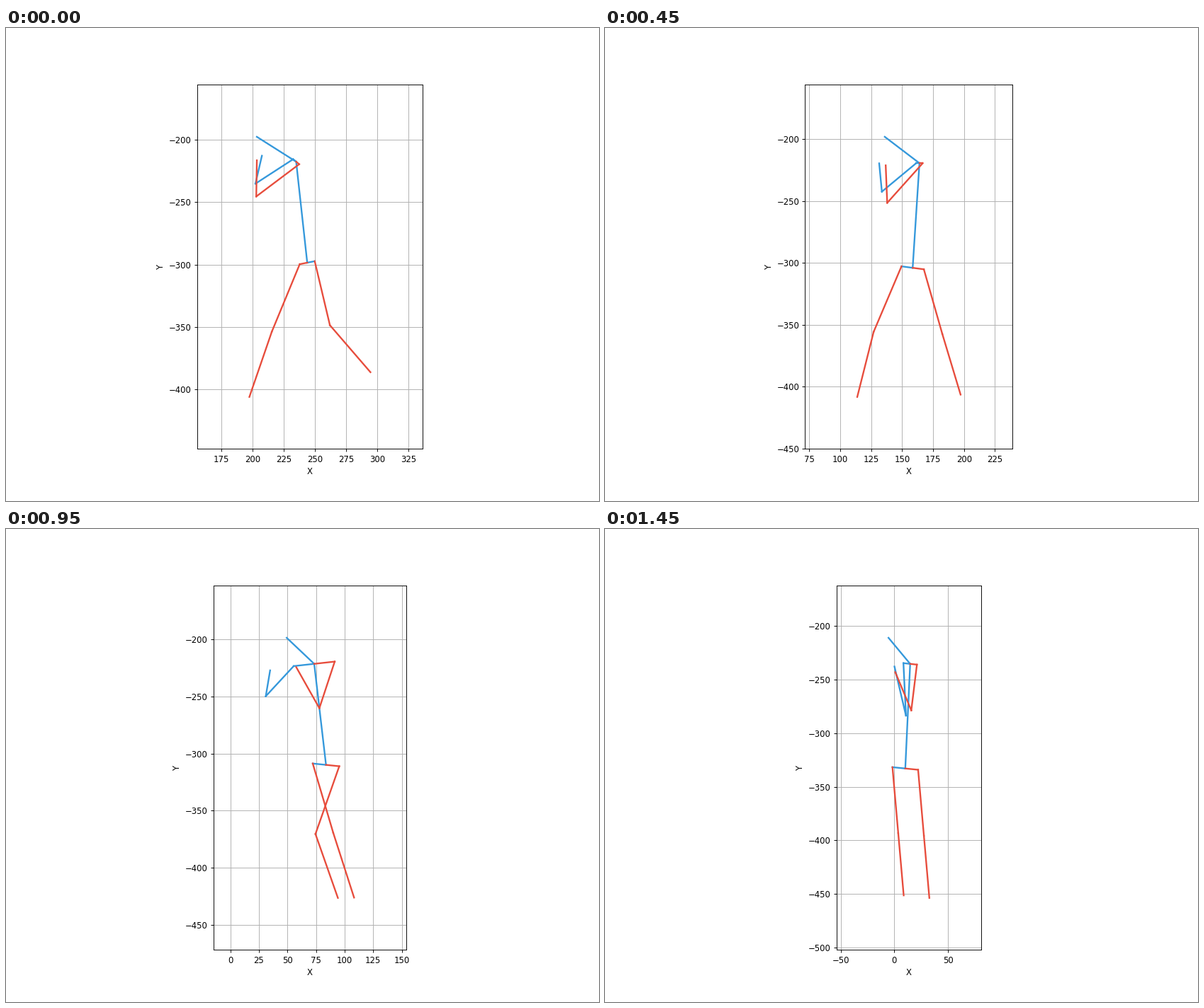
A matplotlib script that plays this animation: 837 px wide and 669 px high, repeating every 1.5 s.

```python
import numpy as np
import matplotlib.pyplot as plt
from matplotlib.animation import FuncAnimation

W, H, DPI = 837, 669, 83.7
FRAMES, INTERVAL = 30, 50
BLUE, RED = "#3498db", "#e74c3c"
MARGIN = 0.2
TAU = 2 * np.pi
STRIDE = 22  # frames per gait cycle
FAR_PHASE, NEAR_PHASE = 0, 0.56
# Pelvis path: time and x
WALK_T = (0, 5, 12, 16, 21, 25, 29)
WALK_X = (243.8, 186.9, 137.3, 101.8, 71.7, 26.3, 10.2)


def ease(t, start, end):
    s = np.clip((t - start) / (end - start), 0, 1)
    return s * s * (3 - 2 * s)


def bump(t, centre, width):
    return np.exp(-((t - centre) / width) ** 2)


def bone(length, degrees):
    """Vector hanging down, swung forward (to the left) by an angle."""
    return -1j * length * np.exp(-1j * np.radians(degrees))


def arm(shoulder, upper, fore):
    elbow = shoulder + bone(*upper)
    return shoulder, elbow, elbow + bone(*fore)


def leg_shape(t, phase):
    """Thigh and shank of a leg with shank length one."""
    x = TAU * (t / STRIDE + phase)
    thigh = 3 + 20 * np.cos(x + 0.24)
    shank = -18 + 33.2 * np.cos(x - TAU / 8) + 13.8 * np.cos(2 * x + 0.22)
    stop = np.clip((t - 25) / 4, 0, 1)
    thigh, shank = (a + stop * (-5 - a) for a in (thigh, shank))
    size = 1 - 0.1 * np.clip(-shank / 30, 0, 1)
    return bone(1.06 * size, thigh), bone(size, shank)


def leg(hip, shape, size):
    return hip + size * np.cumsum((0, *shape))


def pose(t):
    """Chains of joints as complex numbers, each with its colour."""
    rise = ease(t, 19, 26)
    sway = np.sin(TAU * t / STRIDE - 0.92)
    pelvis = np.interp(t, WALK_T, WALK_X) - 1j * (298.5 + 0.6 * t + 17 * rise)
    neck = pelvis - 2.5 + 8 * sway + 1j * (81 + 0.4 * t + 5 * rise)
    head = neck - 31.5 + 0.39 * t + 1j * (20 + 0.15 * t)

    shoulder = (-2.4 - 18.5 * bump(t, 21.5, 6)
                + 2j * np.cos(TAU * t / 36))
    near_arm = arm(neck + shoulder,
                   (36 + 13 * rise, 57 - 0.75 * t - 38 * rise),
                   (23 + 24 * rise,
                    183 + 10 * np.cos(TAU * t / STRIDE) - 12 * rise))
    fold = bump(t, 23, 9)
    far_arm = arm(neck - shoulder,
                  (43, 53 - 46 * ease(t, 0, 28)),
                  (29 + 15 * fold, 181 - 37 * fold))

    # Legs are sized so that the lower foot stands on the ground.
    ground = -405 - 0.5 * t - 33 * ease(t, 16, 23)
    near, far = leg_shape(t, NEAR_PHASE), leg_shape(t, FAR_PHASE)
    size = (pelvis.imag - ground) / max(-sum(s).imag for s in (near, far))
    hip = -12 + 18 * np.exp(-t / 5) + 1.2j
    near_leg = leg(pelvis + hip, near, size)
    far_leg = leg(pelvis - hip, far, size)

    return [
        (BLUE, (head, neck, pelvis, near_leg[0])),
        (BLUE, (neck, *near_arm)),
        (RED, (neck, *far_arm)),
        (RED, (pelvis, *far_leg)),
        (RED, near_leg),
    ]


def bones(t):
    return [(color, np.array(pair)) for color, chain in pose(t)
            for pair in zip(chain, chain[1:])]


plt.rcParams["font.family"] = "DejaVu Sans"
fig, ax = plt.subplots(figsize=((W + 0.01) / DPI, (H + 0.01) / DPI), dpi=DPI)
ax.set_aspect("equal", adjustable="box")
ax.grid(True)
ax.set_xlabel("X")
ax.set_ylabel("Y")
lines = [ax.plot([], [], color=color, lw=2)[0] for color, _ in bones(0)]


def draw(i):
    pairs = [pair for _, pair in bones(i)]
    for line, pair in zip(lines, pairs):
        line.set_data(pair.real, pair.imag)
    joints = np.concatenate(pairs)
    x, y = joints.real, joints.imag
    pad = MARGIN * max(np.ptp(x), np.ptp(y))
    ax.set_xlim(x.min() - pad, x.max() + pad)
    ax.set_ylim(y.min() - pad, y.max() + pad)
    return lines


anim = FuncAnimation(fig, draw, frames=FRAMES, interval=INTERVAL,
                     repeat=True, repeat_delay=0, blit=False)
plt.show()
```
